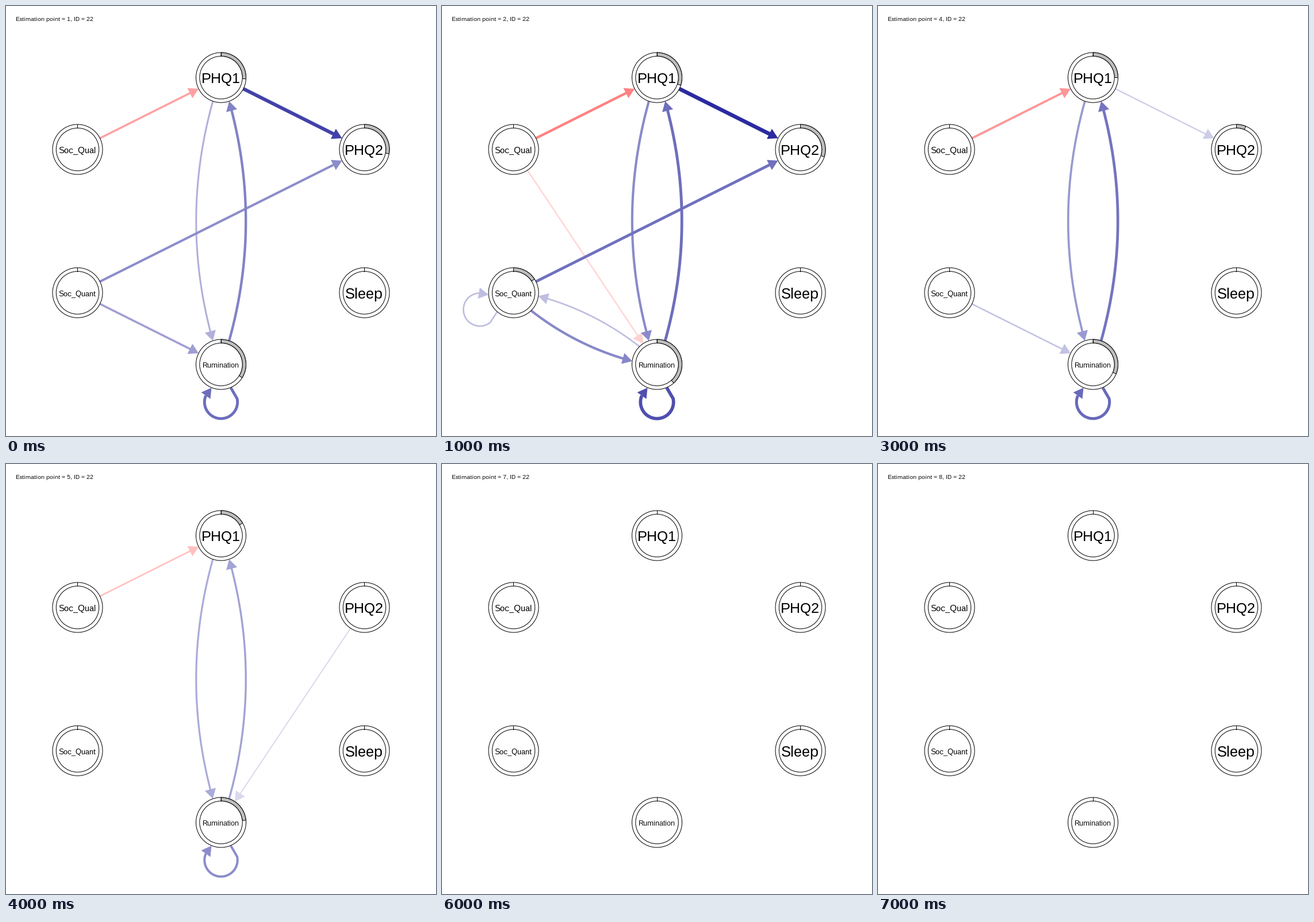
Recreate the animation shown at these times as a matplotlib script. Size 748 by 748 pixels, loop 8000 ms.

```python
import numpy as np
import matplotlib.pyplot as plt
from matplotlib.animation import FuncAnimation
from matplotlib.patches import Circle, Polygon, Wedge

# Crisp text on whole pixels
plt.rcParams.update({"text.hinting": "native", "text.hinting_factor": 1,
                     "font.family": "Liberation Sans"})

SIZE, DPI = 748, 64
PT = 72 / DPI                      # points per pixel
OUTER, INNER = 43.5, 37.2          # node ring radii
HEAD, HALF = 17, 9.8               # arrowhead length and half width
BEND = np.radians(19)              # angle at which curved edges leave a node
MID = np.array([374.0, 374.0])

# key: label, centre, font size in pixels
NODES = {
    "P": ("PHQ1", (374, 124.5), 25),
    "Q": ("PHQ2", (623.5, 249.5), 25),
    "S": ("Sleep", (623.5, 498.8), 26),
    "R": ("Rumination", (374, 623.5), 12),
    "N": ("Soc_Quant", (124.5, 498.8), 13),
    "L": ("Soc_Qual", (124.5, 249.5), 15),
}

# Edge strengths per estimation point (negative is red)
EDGES = [
    dict(LP=-.37, PQ=.74, NQ=.45, NR=.38, PR=.31, RP=.49, RR=.57),
    dict(LP=-.49, PQ=.83, NQ=.56, NR=.47, RN=.255, NN=.255, PR=.46,
         RP=.57, RR=.69, LR=-.18),
    dict(LP=-.38, PQ=.67, NQ=.42, NR=.38, RN=.285, NN=.285, PR=.47,
         RP=.54, RR=.69),
    dict(LP=-.41, PQ=.20, NR=.24, PR=.40, RP=.545, RR=.59),
    dict(LP=-.25, PR=.33, RP=.36, RR=.45, QR=.15),
    dict(PR=.255, RR=.33),
    {},
    {},
]

# Filled part of each ring, in degrees clockwise from the top
FILLS = [
    dict(P=93, Q=100, R=122),
    dict(P=108, Q=107, N=57, R=138),
    dict(P=100, Q=97, N=59, R=134),
    dict(P=90, Q=22, R=112),
    dict(P=60, R=85),
    dict(R=43),
    {},
    {},
]

fig = plt.figure(figsize=(SIZE / DPI, SIZE / DPI), dpi=DPI, facecolor="white")
ax = fig.add_axes([0, 0, 1, 1])


def centre(key):
    return np.array(NODES[key][1], float)


def unit(v):
    return v / np.hypot(*v)


def shade(s):
    full = np.array([0, 0, 139]) if s > 0 else np.array([255, 0, 0])
    return tuple((255 + (full - 255) * abs(s)) / 255)


def link_path(a, b, curved):
    """Points from the rim of node a to the rim of node b."""
    p, q = centre(a), centre(b)
    d = unit(q - p)
    n = np.array([-d[1], d[0]])
    t = np.linspace(0, 1, 400)[:, None]
    if not curved:
        return p + d * OUTER + (q - p - 2 * OUTER * d) * t
    along, side = OUTER * np.cos(BEND), OUTER * np.sin(BEND)
    start = p + d * along + n * side
    end = q - d * along + n * side
    bow = 2 * 0.0866 * np.hypot(*(q - p)) - side
    ctrl = (p + q) / 2 + n * bow
    return (1 - t) ** 2 * start + 2 * t * (1 - t) * ctrl + t ** 2 * end


def loop_path(key):
    """Self loop on the side of the node that faces away from the middle."""
    c = centre(key)
    d = unit(c - MID)
    side = np.array([d[1], -d[0]])
    a = np.radians(np.linspace(-12, 203, 200))
    u = np.r_[17, 28.7 * np.cos(a), -16.5]
    v = np.r_[40.5, 65.5 + 28.7 * np.sin(a), 40.5]
    return c + np.outer(u, side) + np.outer(v, d)


def draw_edge(path, s):
    tip = path[-1]
    body = path[np.hypot(*(path - tip).T) > 16]
    d = unit(tip - body[-1])
    n = np.array([-d[1], d[0]])
    base = tip - d * HEAD
    color = shade(s)
    ax.plot(*body.T, color=color, lw=(0.9 + 7 * abs(s)) * PT,
            solid_capstyle="butt", solid_joinstyle="round", zorder=1)
    ax.add_patch(Polygon([tip, base + n * HALF, base - n * HALF], fc=color,
                         lw=0, zorder=1))


def draw_node(key, fill):
    label, (x, y), size = NODES[key]
    line = dict(ec="black", lw=PT, zorder=2)
    ax.add_patch(Circle((x, y), OUTER, fc="white", **line))
    if fill:
        ax.add_patch(Wedge((x, y), OUTER, -90, fill - 90, width=OUTER - INNER,
                           fc="#bebebe", **line))
    ax.add_patch(Circle((x, y), INNER, fc="white", **line))
    ax.plot([x, x], [y - OUTER, y - INNER], color="black", lw=PT, zorder=2)
    ax.text(x - 0.5, y + 0.344 * size + 1, label, size=size * PT, ha="center",
            va="baseline", zorder=3)


def draw(i):
    ax.clear()
    ax.set_xlim(0, SIZE)
    ax.set_ylim(SIZE, 0)
    ax.axis("off")
    edges = EDGES[i]
    for key, s in sorted(edges.items(), key=lambda e: abs(e[1])):
        a, b = key
        path = loop_path(a) if a == b else link_path(a, b, b + a in edges)
        draw_edge(path, s)
    for key in NODES:
        draw_node(key, FILLS[i].get(key, 0))
    ax.text(17.5, 26, f"Estimation point = {i + 1}, ID = 22", size=10 * PT,
            va="baseline")
    return []


anim = FuncAnimation(fig, draw, frames=len(EDGES), interval=1000,
                     init_func=lambda: [], repeat=True, repeat_delay=0)
plt.show()
```
